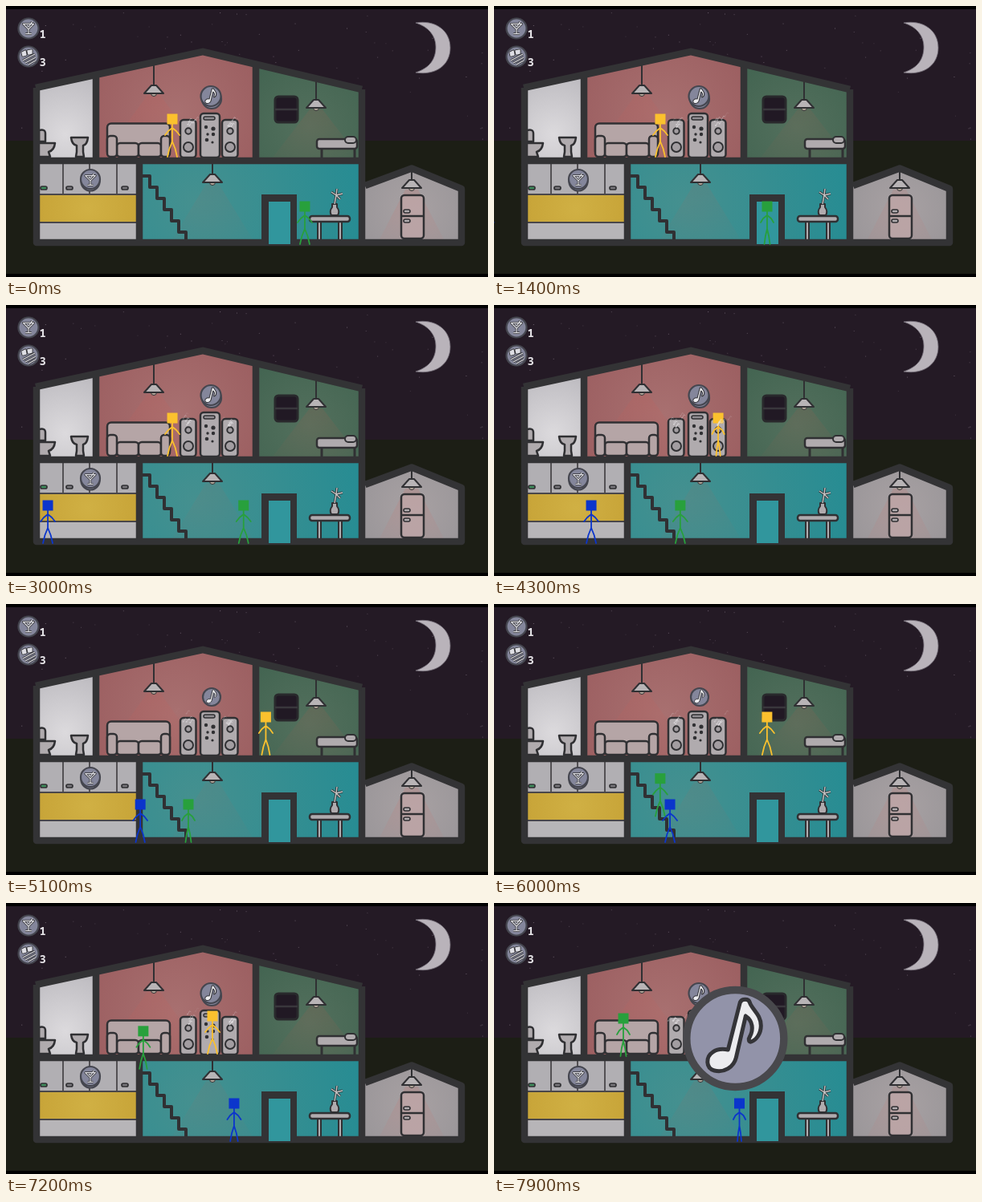
Recreate the animation shown at these times as an HTML page with a canvas. Size 600 by 338 pixels, loop 8 s.

```html
<!DOCTYPE html>
<html lang="en">
<head>
<meta charset="utf-8">
<title>House party</title>
<style>
html, body { margin: 0; width: 100%; height: 100%; overflow: hidden; background: #000; }
canvas { display: block; width: 600px; height: 338px; }
</style>
</head>
<body>
<canvas id="stage" width="600" height="338"></canvas>
<script>
const ctx = document.getElementById('stage').getContext('2d');
const LOOP = 8000, WALL = '#333335', INK = '#303033', GREY = '#b0abae';

function shape(d, fill, stroke, width = 2.5) {
  const p = new Path2D(d);
  if (fill) { ctx.fillStyle = fill; ctx.fill(p); }
  if (stroke) { ctx.strokeStyle = stroke; ctx.lineWidth = width; ctx.stroke(p); }
}

function box(x, y, w, h, r, fill, stroke = INK, width = 2.5) {
  ctx.beginPath();
  ctx.roundRect(x, y, w, h, r);
  if (fill) { ctx.fillStyle = fill; ctx.fill(); }
  if (stroke) { ctx.strokeStyle = stroke; ctx.lineWidth = width; ctx.stroke(); }
}

function dot(x, y, r, fill, stroke, width = 2) {
  ctx.beginPath();
  ctx.arc(x, y, r, 0, 7);
  if (fill) { ctx.fillStyle = fill; ctx.fill(); }
  if (stroke) { ctx.strokeStyle = stroke; ctx.lineWidth = width; ctx.stroke(); }
}

function glow(x, y, r, inner, outer) {
  const g = ctx.createRadialGradient(x, y, 0, x, y, r);
  g.addColorStop(0, inner);
  g.addColorStop(1, outer);
  return g;
}

function rand(n) {
  const v = Math.sin(n * 127.1 + 11.7) * 43758.5453;
  return v - Math.floor(v);
}

// Piecewise linear motion through [time, x, y] keys.
function along(keys, t) {
  let i = 0;
  while (i < keys.length - 2 && t > keys[i + 1][0]) i++;
  const [a, b] = [keys[i], keys[i + 1]];
  const k = Math.min(1, Math.max(0, (t - a[0]) / (b[0] - a[0])));
  return {
    x: a[1] + (b[1] - a[1]) * k,
    y: a[2] + (b[2] - a[2]) * k,
    moving: t > a[0] && t < b[0] && a[1] !== b[1]
  };
}

function sky() {
  ctx.fillStyle = '#000';
  ctx.fillRect(0, 0, 600, 338);
  ctx.fillStyle = '#241a25';
  ctx.fillRect(0, 4, 600, 164);
  ctx.fillStyle = '#1c1e15';
  ctx.fillRect(0, 168, 600, 166);
  for (let i = 0; i < 75; i++) {
    ctx.fillStyle = `rgba(190,175,190,${0.15 + 0.35 * rand(i + 300)})`;
    ctx.fillRect(rand(i) * 600, 6 + rand(i + 100) * 160, 1, 1);
  }
  shape('M510 21C535 17 553 31 553 52C553 73 536 87 510 83C528 77 535 66 535 51C535 37 526 26 510 21Z', '#b9b3ba', '#77707a', 0.8);
}

function lamp(x, top, y, floor, spread, tint, t) {
  const flick = 0.2 + 0.03 * Math.sin(t / 170 + x);
  shape(`M${x - 8} ${y + 12}L${x + 8} ${y + 12}L${x + spread} ${floor}L${x - spread} ${floor}Z`,
    glow(x, y + 12, floor - y + 5, `rgba(${tint},${flick})`, `rgba(${tint},.06)`));
  dot(x, y + 10, 3.5, '#b8ac9e', INK, 1);
  shape(`M${x} ${top}V${y}`, null, INK, 2);
  shape(`M${x - 3} ${y}H${x + 3}L${x + 12} ${y + 10}H${x - 12}Z`, '#b8b4b6', INK, 2);
}

function bathroom() {
  shape('M38 103L112 87V193H38Z', glow(74, 160, 80, '#dcdadd', '#bcbabf'));
  shape('M41 155Q49 153 49 159V169H41ZM42 171H61Q60 180 53 182L55 188H42', GREY, INK);
  shape('M81 164H102Q101 173 96 174V182L97 188H87L88 182V174Q82 173 81 164Z', GREY, INK);
}

function speaker(x) {
  box(x, 142, 19.5, 47, 4, GREY);
  dot(x + 10, 156, 3.7, '#a29da1', INK);
  dot(x + 10, 176, 6, '#a29da1', INK);
}

function livingRoom(t) {
  shape('M112 88L245 60L311 74V193H112Z', glow(212, 135, 115, '#a87070', '#9c5f61'));
  lamp(184, 70, 99, 189, 64, '195,95,90', t);
  const sofa = '#b5a5a6';
  box(126, 146.5, 78, 40, 5, sofa);
  box(138, 171, 27, 17, 4, sofa);
  box(165, 171, 28, 17, 4, sofa);
  box(126, 162, 12, 26, 4, sofa);
  box(193, 162, 11, 26, 4, sofa);
  speaker(217);
  speaker(269);
  box(242, 134, 24, 55, 4, GREY);
  box(246, 138, 14, 4, 2, '#918d92', INK, 1.5);
  for (const [x, y, r] of [[249, 151, 2.2], [258, 153, 2.6], [251, 160, 1.7], [258, 160, 2.2], [250, 167, 2.3], [257, 170, 1.6]])
    dot(x, y, r, INK);
}

function bedroom(t) {
  shape('M311 75L443 105V193H311Z', glow(377, 150, 90, '#53705d', '#446552'));
  lamp(386, 90, 117, 189, 54, '150,95,80', t);
  box(335, 113, 28, 32, 4, '#211924', '#29292c', 3);
  shape('M335 129H363', null, '#39373c', 2.5);
  shape('M393 178V189M434 178V189', null, INK, 3);
  box(387, 166, 50, 12, 3, GREY);
  box(422, 163, 14, 8, 4, GREY, INK, 2);
}

function kitchen() {
  shape('M38 193H166V236H38Z', '#b1afb3');
  shape('M38 236H166V271H38Z', glow(102, 252, 75, '#d0b044', '#c6a236'));
  shape('M38 271H166V295H38Z', '#b7b5b8');
  shape('M71 197V235M104 197V235M138 197V235M42 235H162M42 270H162', null, '#4a474a', 1.8);
  for (const x of [43, 75, 144]) box(x, 225, 8, 4, 2, x === 43 ? '#3e8b5b' : '#77757a', INK, 1.7);
}

function hall(t) {
  shape('M166 193H443V295H166Z', glow(235, 245, 215, '#45908f', '#268c93'));
  lamp(257, 197, 210, 291, 50, '130,115,110', t);
  let d = 'M170 212';
  for (let i = 0; i < 6; i++) d += 'h9v14';
  shape(d, null, INK, 4);
  shape('M390 268V291M416 268V291', null, INK, 6);
  shape('M390 268V291M416 268V291', null, GREY, 2);
  box(378, 262, 50, 7, 3, GREY);
  shape('M406 247H412V251Q416 256 413 261H405Q402 256 406 251Z', GREY, INK, 2);
  const flower = 'M409 247L411 236M411 236L405 232M411 236L412 228M411 236L419 234M411 236L416 241';
  shape(flower, null, INK, 3);
  shape(flower, null, '#c3c5c5', 1.4);
}

function garage(t) {
  shape('M447 224L505 202L567 228V295H447Z', glow(506, 252, 72, '#a8a1a3', '#9a9699'));
  lamp(505, 204, 217, 291, 40, '200,110,105', t);
  box(492, 236, 28, 54, 4, 'rgba(190,166,167,.85)');
  shape('M492 262H520', null, INK, 2.5);
  box(495, 254, 8, 4, 2, GREY, INK, 1.6);
  box(495, 266, 8, 4, 2, GREY, INK, 1.6);
}

function walls() {
  ctx.lineJoin = 'round';
  shape('M38 102V295H567V228L505 202.5L447 224M38 193H443M112 88V193M311 74V193M166 193V295M443 104V295', null, WALL, 8.5);
  shape('M37 102L245 57L443 104', null, WALL, 8.8);
  shape('M318 235H362V297H318Z', WALL);
  shape('M327 244H354V297H327Z', '#31969d');
}

function glass(x, y, s) {
  const at = (a, b) => `${x + a * s} ${y + b * s}`;
  const d = `M${at(-7, -6)}L${at(7, -6)}L${at(0, 1)}ZM${at(0, 1)}L${at(0, 7)}M${at(-4, 7)}L${at(4, 7)}M${at(1, -3)}L${at(5, -9)}`;
  shape(d, '#b9bac6', INK, 3 * s);
  shape(d, null, '#dedee4', 1.3 * s);
}

function badge(x, y, r) {
  dot(x, y, r, '#84869b', '#45464f', 2.2);
}

// Music note around the origin, sized for the large popup.
function note(x, y, s) {
  ctx.save();
  ctx.translate(x, y);
  ctx.scale(s, s);
  shape(`M6 -45C8 -50 17 -50 18 -45C21 -36 32 -30 32 -16C32 -6 26 2 20 4C17 5 16 1 18 -2
    C23 -11 22 -22 13 -28L1 24C-2 36 -14 43 -26 40C-37 37 -37 23 -28 17C-21 12 -14 13 -9 14Z`,
    '#ececef', '#343438', 5);
  ctx.restore();
}

function icons(away) {
  badge(105, 219, 11.5);
  badge(105, 216, 12);
  glass(105, 217, 0.9);
  if (away) {
    badge(256, 116, 11);
    note(256, 116, 0.19);
  } else {
    badge(256, 116, 12);
    badge(255, 112.5, 12.5);
    note(255, 113, 0.21);
  }
}

function hud() {
  badge(28, 28, 12.5);
  glass(28, 28, 0.95);
  badge(28, 63, 12.5);
  const hand = 'M20 58L24 56L25 61L21 62ZM27 56L32 55L32 59L28 60ZM21 68L36 60M24 71L37 64M28 73L37 68';
  shape(hand, '#dedee4', INK, 3);
  shape(hand, '#dedee4', '#dedee4', 1.3);
  ctx.fillStyle = '#e6e4e8';
  ctx.font = 'bold 14px "Noto Sans Mono", monospace';
  ctx.fillText('1', 41.5, 40);
  ctx.fillText('3', 41.5, 74.5);
}

function sparks(t) {
  for (let i = 0; i < 12; i++) {
    const life = t / 1000 + rand(i + 40), age = life % 1;
    const seed = i + Math.floor(life) * 12;
    const x = (i % 2 ? 279 : 227) + (rand(seed) - 0.5) * 34 * age;
    const y = 152 - age * (8 + 12 * rand(seed + 9));
    ctx.globalAlpha = 0.8 * (1 - age);
    shape(`M${x} ${y}l2 -4l2 1`, null, '#e5e2e5', 1);
    dot(x - 0.5, y, 1, '#e5e2e5');
  }
  ctx.globalAlpha = 1;
}

const people = [
  { color: '#fbc12e', step: 500, rest: 1,
    path: [[0, 207, 141], [3000, 207, 141], [5400, 340, 141], [6000, 340, 141], [6700, 257, 141]] },
  { color: '#28a03c', step: 430, rest: 0.5,
    path: [[0, 372, 250], [650, 340, 250], [2100, 340, 250], [4400, 227, 250], [5330, 227, 250], [7530, 161, 144]] },
  { color: '#0b35cc', step: 430, rest: 0.3,
    path: [[900, -22, 250], [1150, -8, 250], [1900, -8, 250], [3000, 52, 250], [4300, 121, 250], [6000, 219, 250], [7600, 305.5, 250]] }
];

function person({ color, step, rest, path }, t) {
  const { x, y, moving } = along(path, t);
  const swing = moving ? Math.abs(Math.cos(Math.PI * (t - 3000) / step)) : rest;
  const foot = 1 + 5 * swing, arm = 7 + 2 * swing;
  ctx.lineCap = 'round';
  shape(`M${x} ${y + 6}V${y + 28}
    M${x - arm} ${y + 20}L${x - 5} ${y + 15}L${x} ${y + 11}L${x + 5} ${y + 15}L${x + arm} ${y + 20}
    M${x - foot} ${y + 47}L${x - foot * 0.6} ${y + 37}L${x} ${y + 28}L${x + foot * 0.6} ${y + 37}L${x + foot} ${y + 47}`,
    null, color, 1.8);
  ctx.lineCap = 'butt';
  ctx.fillStyle = color;
  ctx.fillRect(x - 6.5, y - 6.5, 13, 13);
}

function popup(t) {
  const k = Math.min(1, Math.max(0, (t - 7550) / 300));
  if (!k) return;
  const s = 1 - (1 - k) ** 2;
  dot(300.3, 169, 60.5 * s, '#9293a9', '#48484c', 9.4 * s);
  note(300.3, 169, s);
}

function draw(t) {
  sky();
  bathroom();
  livingRoom(t);
  bedroom(t);
  kitchen();
  hall(t);
  garage(t);
  walls();
  icons(along(people[0].path, t).x > 312);
  people.forEach(p => person(p, t));
  sparks(t);
  hud();
  popup(t);
}

const start = performance.now();
function tick() {
  draw((performance.now() - start) % LOOP);
  requestAnimationFrame(tick);
}
tick();
</script>
</body>
</html>
```
